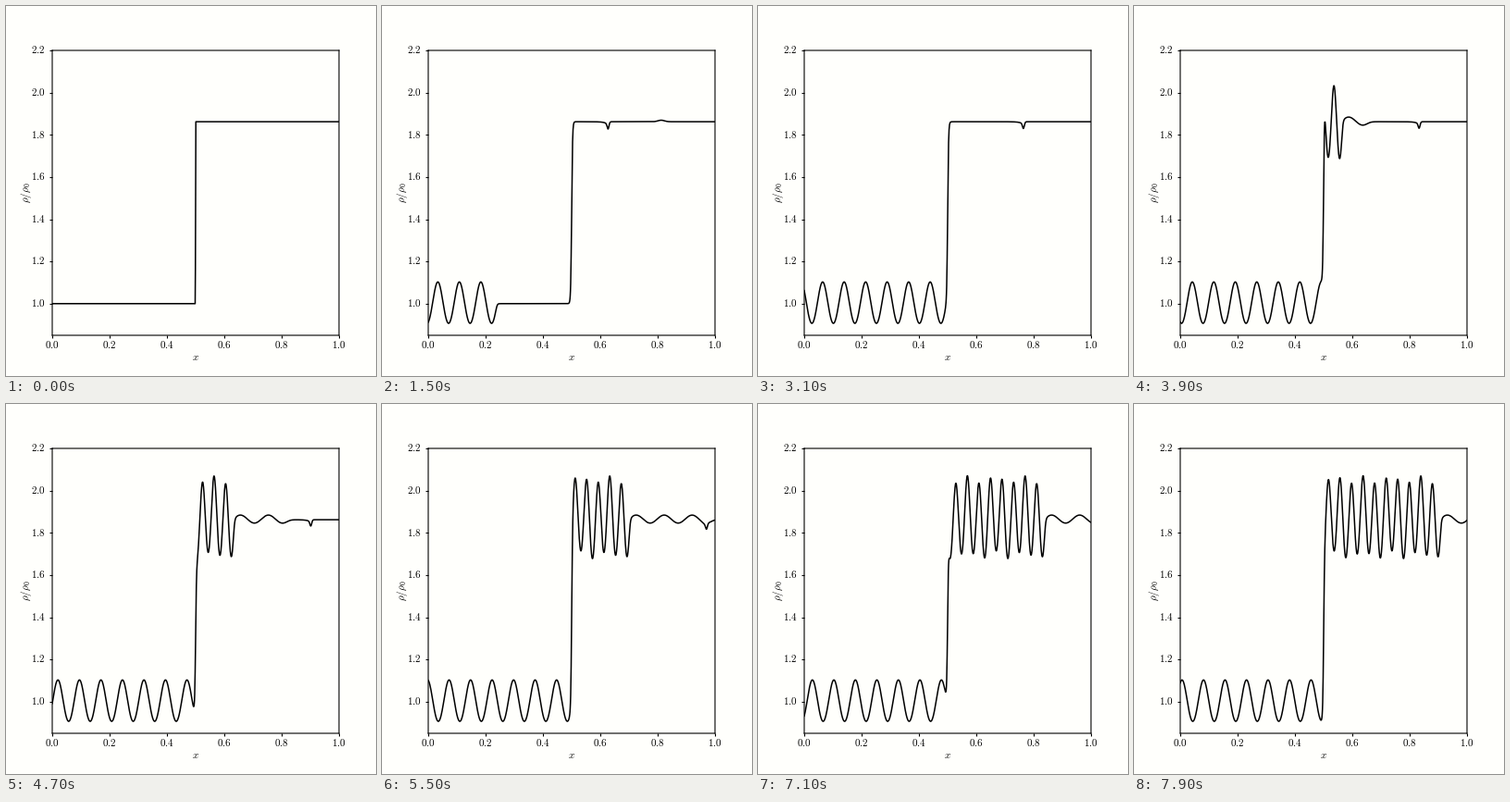
Animation, 400 px wide and 400 px high, one loop 8000 ms. Source, as a matplotlib script:

```python
import numpy as np
import matplotlib.pyplot as plt
from matplotlib.animation import FuncAnimation

FRAMES = 80
INTERVAL = 100
SIZE = 400

# Entropy wave running into a standing shock, lengths in axis units, time in frames
MACH, GAMMA = 1.5, 1.4
SHOCK = 0.5
U1 = 0.01598
WAVELEN = 0.075
AMP = 0.098

RATIO = (GAMMA + 1) * MACH**2 / ((GAMMA - 1) * MACH**2 + 2)
P_RATIO = 1 + 2 * GAMMA / (GAMMA + 1) * (MACH**2 - 1)
U2 = U1 / RATIO
C2 = U1 / MACH * np.sqrt(P_RATIO / RATIO)
ARRIVAL = SHOCK / U1
PERIOD = WAVELEN / U1

x = np.linspace(0, 1, 1201)


def wave(front, length, soft):
    """Sine train behind a slightly rounded front."""
    behind = soft * np.logaddexp(0, (front - x) / soft)
    return -np.sin(2 * np.pi * behind / length)


def start_dip(t):
    d = x - (SHOCK + U2 * t - 0.002)
    depth = 0.037 - 0.00015 * t
    tail = 0.65 * np.exp(-(d / 0.0045) ** 2) + 0.35 * np.exp(-np.abs(d) / 0.012)
    return -depth * np.where(d < 0, tail, np.exp(-(d / 0.0048) ** 2))


def start_bump(t):
    width = 0.0029 * np.sqrt(t)
    d = x - (SHOCK + (U2 + C2) * t)
    return 0.00008 / width * np.exp(-0.5 * (d / width) ** 2)


def density(t):
    if t == 0:
        return np.interp(x, [0.4988, 0.5008], [1, RATIO])
    left = np.exp(AMP * wave(U1 * t, WAVELEN, 0.002))

    since = t - ARRIVAL
    hot_front = SHOCK + U2 * since
    sound_front = SHOCK + (U2 + C2) * since
    entropy = wave(hot_front, U2 * PERIOD, 0.002)
    sound = wave(sound_front, (U2 + C2) * PERIOD, 0.007)
    right = RATIO * np.exp(0.0955 * entropy) + 0.019 * sound
    right += 0.003 / (1 + np.exp(np.clip((x - sound_front) / 0.01, -50, 50)))
    right += start_dip(t) + start_bump(t)

    mix = 0.5 * (1 + np.tanh((x - SHOCK) / 0.0032))
    return left * (1 - mix) + right * mix


plt.rcParams.update({"mathtext.fontset": "cm", "font.size": 8})
fig = plt.figure(figsize=(SIZE / 100, SIZE / 100), dpi=100, facecolor="#fffffc")
ax = fig.add_axes([0.125, 0.11, 0.775, 0.77], facecolor="none")
ax.set_xlim(0, 1)
ax.set_ylim(0.85, 2.2)
xticks = np.arange(0, 1.1, 0.2)
yticks = np.arange(1.0, 2.3, 0.2)
ax.set_xticks(xticks)
ax.set_yticks(yticks)
ax.tick_params(length=2.2, width=0.8, labelbottom=False, labelleft=False)

# Keep frame and ticks at their true positions instead of whole pixels
for spine in ax.spines.values():
    spine.set_snap(False)
for tick in ax.get_xticklines() + ax.get_yticklines():
    tick.set_snap(False)


def label(px, py, text, ha="center", **kw):
    fig.text(px / SIZE, 1 - py / SIZE, f"${text}$", ha=ha, va="baseline", **kw)


for v in xticks:
    label(50 + 310 * v, 370, f"{v:.1f}")
for v in yticks:
    label(43, 48 + 308 * (2.2 - v) / 1.35 + 3.3, f"{v:.1f}", ha="right")
label(205, 383, "x")
label(24.6, 202, r"\rho/\rho_0", rotation=90, rotation_mode="anchor")

line, = ax.plot(x, density(0), color="black", lw=1.1)


def update(i):
    line.set_ydata(density(i))
    return line,


anim = FuncAnimation(fig, update, frames=FRAMES, interval=INTERVAL,
                     repeat=True, repeat_delay=0)
plt.show()
```
